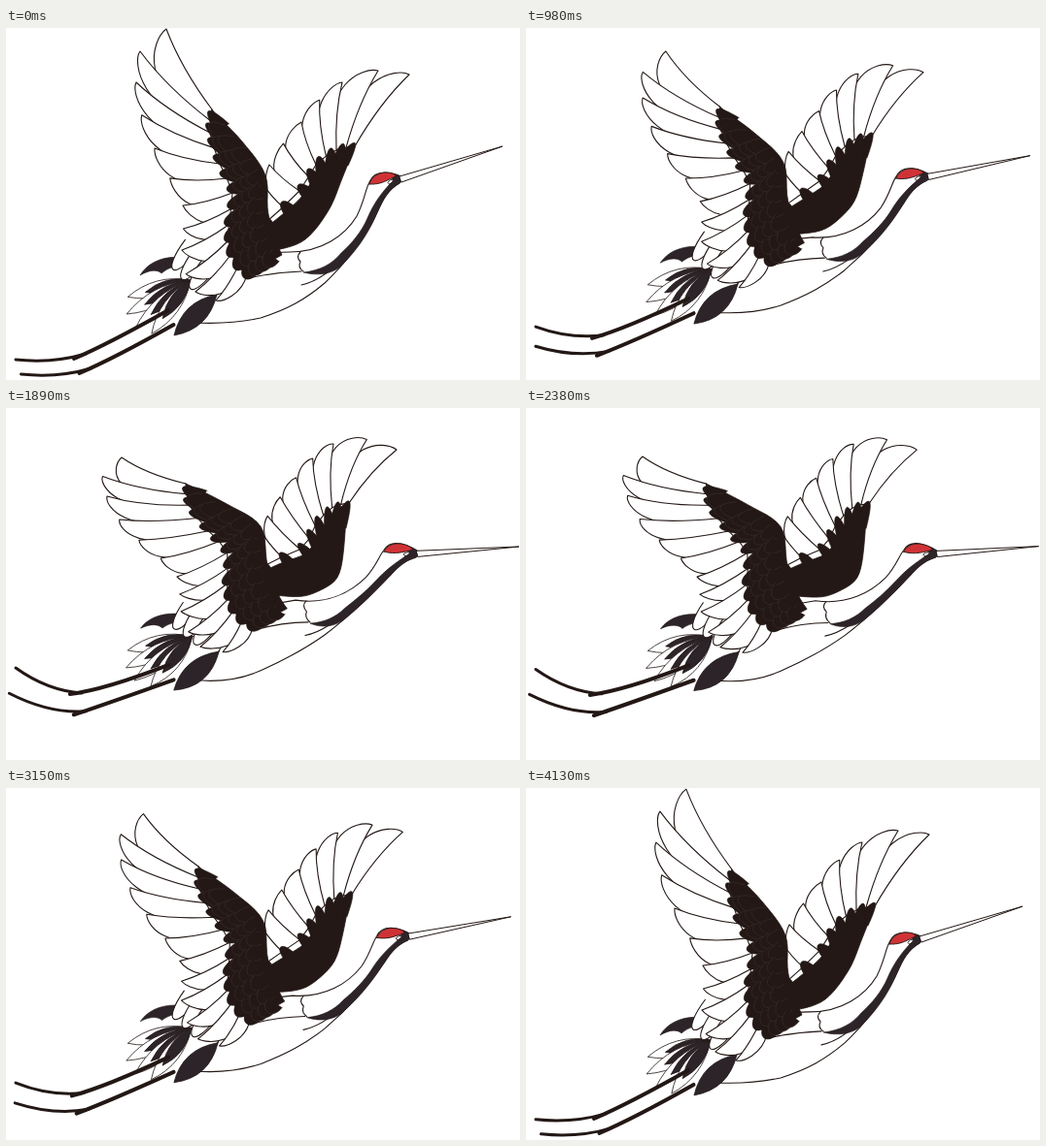
Write an HTML page that moves like this. It is 529 by 363 pixels and loops after 4200 ms.

```html
<!DOCTYPE html>
<html lang="en">
<head>
<meta charset="utf-8">
<title>Flying crane</title>
<style>
html, body { margin: 0; width: 100%; height: 100%; overflow: hidden; background: #fff; }
svg { display: block; width: 529px; height: 363px; }
path { stroke-linejoin: round; stroke-linecap: round; }
</style>
</head>
<body>
<svg id="stage" viewBox="0 0 529 363"></svg>
<script>
const LOOP = 4200, STEP = 70;
const INK = '#231815', PLUME = '#2d242a', VEIN = '#3d322f', RED = '#cf3236';
const stage = document.getElementById('stage');
const parts = [];

const rows = (s, n) => {
  const v = s.trim().split(/[\s,]+/).map(Number), out = [];
  for (let i = 0; i < v.length; i += n) out.push(v.slice(i, i + n));
  return out;
};
const mix = (a, b, t) => a + (b - a) * t;
const mixPt = (p, q, t) => [mix(p[0], q[0], t), mix(p[1], q[1], t)];
const at = ([x, y]) => `${x.toFixed(2)} ${y.toFixed(2)}`;
const range = n => Array.from({ length: n }, (_, i) => i);

// Local frame at p: along the direction from "base" and to its side
function frame(base, p) {
  const len = Math.hypot(p[0] - base[0], p[1] - base[1]);
  const dx = (p[0] - base[0]) / len, dy = (p[1] - base[1]) / len;
  return {
    len, dx, dy,
    off: (along, side) => at([p[0] + dx * along + dy * side, p[1] + dy * along - dx * side])
  };
}

// Spline through evenly spaced keys; the first and last only guide its ends
function curve(text) {
  const keys = rows(text, 2), n = keys.length - 3;
  return t => {
    const i = Math.min(Math.floor(t * n), n - 1), u = t * n - i;
    const [a, b, c, d] = keys.slice(i, i + 4);
    return [0, 1].map(k => b[k] + u / 2 * (c[k] - a[k] + u * (2 * a[k] - 5 * b[k] +
      4 * c[k] - d[k] + u * (3 * (b[k] - c[k]) + d[k] - a[k]))));
  };
}

// Each pin: wings-up x y, wings-down x y
const bodyPins = rows(`303 232 309 200, 306 251 313 221, 350 213 356 189, 373 160 388 147,
  405 159 422 153, 511 122 528 143, 328 263 328 234, 200 304 201 281, 182 238 184 214,
  123 303 122 275, 70 348 65 304, 10 342 10 268, 16 358 3 296`, 4);
const nearPins = rows(`165 1 119 51, 134 56 104 91, 171 152 161 152, 180 228 179 209,
  213 281 220 252, 212 84 185 78, 267 152 262 122, 284 232 289 205`, 4);
const farPins = rows(`415 48 402 43, 346 56 337 37, 287 122 284 95, 359 122 353 98,
  339 172 344 165, 290 227 290 195`, 4);

// Moving-least-squares affine warp of a point by a set of pins
function warp([x, y], pins) {
  let s = 0, px = 0, py = 0, qx = 0, qy = 0;
  const w = pins.map(([a, b, c, d]) => {
    const k = ((a - x) ** 2 + (b - y) ** 2 + 0.5) ** -1.5;
    s += k; px += k * a; py += k * b; qx += k * c; qy += k * d;
    return k;
  });
  px /= s; py /= s; qx /= s; qy /= s;
  let xx = 0, xy = 0, yy = 0, xu = 0, yu = 0, xv = 0, yv = 0;
  pins.forEach(([a, b, c, d], i) => {
    const k = w[i], dx = a - px, dy = b - py, u = c - qx, v = d - qy;
    xx += k * dx * dx; xy += k * dx * dy; yy += k * dy * dy;
    xu += k * dx * u; yu += k * dy * u; xv += k * dx * v; yv += k * dy * v;
  });
  const det = xx * yy - xy * xy, dx = x - px, dy = y - py;
  return [
    qx + ((yy * xu - xy * yu) * dx + (xx * yu - xy * xu) * dy) / det,
    qy + ((yy * xv - xy * yv) * dx + (xx * yv - xy * xv) * dy) / det
  ];
}

function add(pins, d, fill = 'none', stroke = INK, width = 1.1) {
  const el = document.createElementNS('http://www.w3.org/2000/svg', 'path');
  el.setAttribute('fill', fill);
  el.setAttribute('stroke', stroke);
  el.setAttribute('stroke-width', width);
  stage.append(el);
  const from = [], to = [];
  const form = d.replace(/(-?[\d.]+) (-?[\d.]+)/g, (m, x, y) => {
    const p = [+x, +y];
    from.push(p);
    to.push(warp(p, pins));
    return '#';
  });
  parts.push({ el, form, from, to });
}

// Long feather whose trailing side runs under the next one
function feather(pins, root, tip, nextRoot, nextTip) {
  const { len, dx, dy, off } = frame(root, tip);
  const gap = (nextTip[0] - tip[0]) * dy - (nextTip[1] - tip[1]) * dx;
  add(pins, `M${at(root)} Q${off(-len * 0.45, len * 0.07)} ${at(tip)} ` +
    `C${off(-2, gap * 0.55)} ${off(-len * 0.45, gap * 1.7)} ${at(nextRoot)} Z`, '#fff');
}

// Short feather end with its apex at p; a low taper makes it pointed
function scale(pins, base, p, len, width, taper, fill, stroke, line) {
  const { off } = frame(base, p), h = width / 2;
  add(pins, `M${off(-len, -h)} C${off(len / 3, -h * taper)} ${off(len / 3, h * taper)} ` +
    off(-len, h), fill, stroke, line);
}

function leaf(root, tip, width, fill) {
  const { len, off } = frame(root, tip);
  add(bodyPins, `M${at(root)} Q${off(-len / 2, -width)} ${at(tip)} ` +
    `Q${off(-len / 2, width)} ${at(root)} Z`, fill, INK, 0.8);
}

// White feathers from roots to tips, then dark rows between roots and leading edge
function wing(pins, count, tips, roots, lead, bands, size) {
  for (const i of range(count)) {
    const t = i / count, u = (i + 1) / count;
    feather(pins, roots(t), tips(t), roots(u), tips(u));
  }
  const steps = range(25).map(i => i / 24);
  const edge = steps.map(t => mixPt(roots(t), lead(t), 0.15)).reverse();
  add(pins, 'M' + [...steps.map(lead), ...edge].map(at).join(' L') + ' Z', INK, INK, 0.8);
  for (const row of range(bands)) {
    const n = count - row;
    for (const i of range(n)) {
      const t = mix(0.04 + row * 0.09, 1, i / (n - 1));
      const base = mixPt(roots(t), lead(t), row * 0.2);
      const { dx, dy } = frame(roots(t), tips(t));
      const apex = [base[0] + dx * 5, base[1] + dy * 5];
      scale(pins, base, apex, row ? 13 : mix(24, 15, t), size, mix(0.35, 1, t),
        INK, row ? VEIN : INK, 0.6);
    }
  }
}

// Far wing
wing(farPins, 8,
  curve('417 135, 415 48, 346 56, 304 97, 271 141, 262 180, 255 210'),
  curve('372 118, 359 122, 340 126, 319 141, 302 168, 268 200, 250 215'),
  curve('365 105, 359 122, 346 155, 332 188, 308 218, 278 229, 255 230'),
  1, 14);

// Tail: each feather is dark at its base and white towards the tip
add(bodyPins, `M184 237 C162 234 146 242 138 255 C148 249 156 249 160 253
  C168 246 176 245 185 246 Z`, PLUME, INK, 0.6);
for (const i of range(4)) {
  const root = [190, 260], a = (165 - 13 * i) * Math.PI / 180, len = 67 + 9 * Math.sin(i);
  const tip = [root[0] + len * Math.cos(a), root[1] + len * Math.sin(a)];
  leaf(root, tip, 16, '#fff');
  leaf(root, mixPt(root, tip, 0.72), 12, PLUME);
}

// Legs
for (const k of range(2)) {
  const p = (x, y) => at([x + 5.5 * k, y + 15 * k]);
  add(bodyPins, `M${p(10, 342)} Q${p(48, 346)} ${p(82, 336)}`, 'none', INK, 3);
  add(bodyPins, `M${p(70, 341)} Q${p(105, 326)} ${p(167, 291)}`, 'none', INK, 4);
}

// Body and neck
add(bodyPins, `M262 232 L292 231 C325 231 349 214 361 194 C369 178 370 166 374 159
  C377 151 384 149 390 149 C398 149 405 152 407 154 L405 160 C391 168 387 179 383 188
  C372 212 354 238 328 263 C308 280 290 290 262 299 C240 304 215 305 194 304
  L214 280 L230 250 Z`, '#fff');
leaf([217, 275], [173, 317], 20, PLUME);
add(bodyPins, 'M254 257 Q278 252 304 251');
add(bodyPins, 'M303 231 Q298 236 303 241 Q300 247 306 251');
add(bodyPins, 'M304 265 Q318 262 332 251');
add(bodyPins, `M400 151 L407 153 L406 159 C393 167 388 178 383 188 C376 206 364 226 348 242
  C338 254 322 256 306 252 C324 250 336 243 345 232 C356 222 366 210 372 196
  C378 182 385 172 394 162 Z`, PLUME, INK, 0.6);

// Head
add(bodyPins, 'M405 153 L511 122 L407 159 Z', '#fff', INK, 1);
add(bodyPins, `M374 161 C376 153 384 149 391 149 C397 149 401 151 401 153
  C394 156 386 162 374 161 Z`, RED, INK, 0.9);
add(bodyPins, 'M393 159 Q395 156 399 156 Q398 159 395 161 Z', '#fff', INK, 0.9);

// Near wing
for (const i of range(3)) {
  const p = [172 + 9 * i, 249 + 10 * i];
  scale(nearPins, [p[0] + 6, p[1] - 8], p, 32, 17, 1, '#fff', INK, 1.1);
}
wing(nearPins, 12,
  curve(`330 5, 165 1, 134 56, 153 124, 182 183, 181 229, 195 272, 238 268, 260 135`),
  curve(`214 60, 212 84, 210 108, 220 140, 233 170, 229 203, 232 233, 248 254, 270 250`),
  curve('200 60, 212 84, 243 117, 267 152, 270 192, 284 234, 300 250'),
  4, 17);

function draw(now) {
  const time = Math.floor(now % LOOP / STEP) * STEP;
  const bend = (1 - Math.cos(time / LOOP * 2 * Math.PI)) / 2 / 0.976;
  for (const { el, form, from, to } of parts) {
    let i = 0;
    el.setAttribute('d', form.replace(/#/g, () => {
      const p = at(mixPt(from[i], to[i], bend));
      i++;
      return p;
    }));
  }
}

function tick() {
  draw(performance.now());
  requestAnimationFrame(tick);
}
tick();
</script>
</body>
</html>
```
